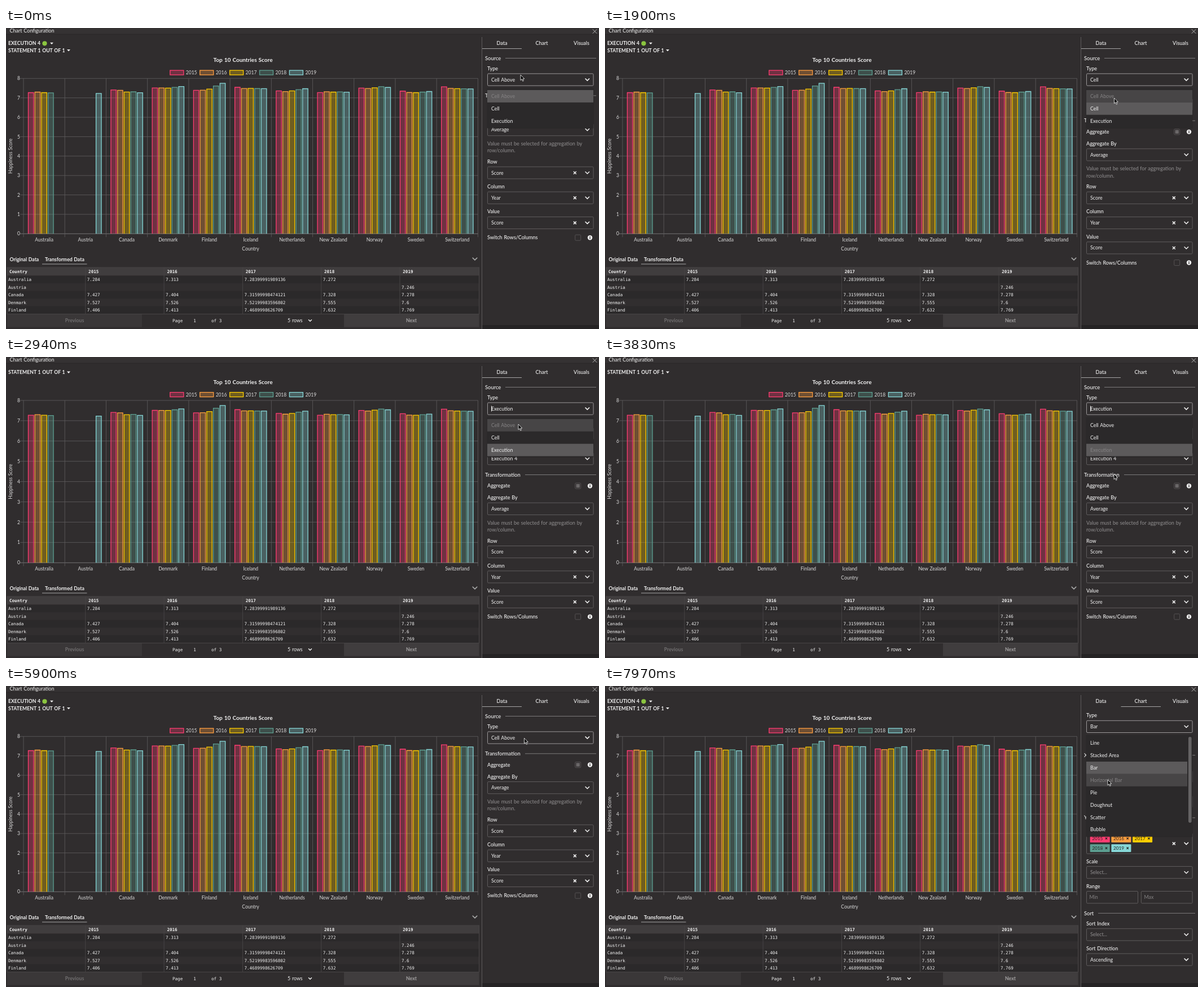
Recreate the animation shown at these times as an HTML page. Size 1051 by 533 pixels, loop 8000 ms.

```html
<!DOCTYPE html>
<html lang="en">
<head>
<meta charset="utf-8">
<title>Chart Configuration</title>
<style>
  html, body { margin: 0; width: 100%; height: 100%; overflow: hidden; background: #302d2e; }
  svg { display: block; width: 100vw; height: 100vh; }
  text { font: 400 9px Lato, "Open Sans", sans-serif; word-spacing: .06em; fill: #f2f2f2; white-space: pre; }
  .label { font-weight: 500; }
  .section { font-size: 9.4px; font-weight: 500; }
  .value { font-size: 8.85px; }
  .dim { fill: #918f90; }
  .faint { fill: #858384; }
  .bold { font-size: 8.7px; font-weight: 700; }
  .title { font-size: 10px; font-weight: 700; }
  .axis { font-size: 8.5px; fill: #dcdcdc; }
  .mono { font: 400 7.58px "DejaVu Sans Mono", "Noto Sans Mono", monospace; word-spacing: 0; }
  .head { font-weight: 700; }
  .mid { text-anchor: middle; }
  .end { text-anchor: end; }
  .tag { font-size: 8.3px; fill: #222; }
</style>
</head>
<body>
<svg viewBox="0 0 1051 533" preserveAspectRatio="none">
  <g id="frame"></g>
  <g id="chart"></g>
  <g id="panel"></g>
  <g id="menu"></g>
  <path id="cursor" d="M0 0V9.6L2.2 7.6 3.8 11.2 5.3 10.5 3.8 7H6.8Z" fill="#000" stroke="#fff" stroke-width=".8" stroke-linejoin="round"/>
</svg>
<script>
const $ = id => document.getElementById(id);

// Drawing helpers; text is placed by its vertical centre
const text = (x, y, s, cls = '', extra = '') =>
  `<text x="${x}" y="${y + (cls.includes('mono') ? 2.7 : 3.1)}" class="${cls}" ${extra}>${s}</text>`;
const rect = (x, y, w, h, fill, extra = '') =>
  `<rect x="${x}" y="${y}" width="${w}" height="${h}" fill="${fill}" ${extra}/>`;
const path = (d, color, width = 1, extra = '') =>
  `<path d="${d}" fill="none" stroke="${color}" stroke-width="${width}" ${extra}/>`;
const hline = (x1, x2, y, color, width) => path(`M${x1} ${y}H${x2}`, color, width);
const vline = (x, y1, y2, color, width) => path(`M${x} ${y1}V${y2}`, color, width);
const chevron = (x, y, color = '#f0f0f0', r = 3.3) =>
  path(`M${x - r} ${y - r / 2}L${x} ${y + r / 2}L${x + r} ${y - r / 2}`, color, 1.5, 'stroke-linecap="round"');
const cross = (x, y, r, color, width) =>
  path(`M${x - r} ${y - r}L${x + r} ${y + r}M${x + r} ${y - r}L${x - r} ${y + r}`, color, width);
const triangle = (x, y) => `<path d="M${x - 3} ${y - 1.6}h6l-3 3.4z" fill="#f2f2f2"/>`;

const YEARS = [2015, 2016, 2017, 2018, 2019];
const COLORS = ['#ff3d71', '#ff9f40', '#ffcd00', '#5c9e90', '#86d7d7'];
const SCORES = {
  'Australia': [7.284, 7.313, 7.284, 7.272, 0],
  'Austria': [0, 0, 0, 0, 7.246],
  'Canada': [7.427, 7.404, 7.316, 7.328, 7.278],
  'Denmark': [7.527, 7.526, 7.522, 7.555, 7.6],
  'Finland': [7.406, 7.413, 7.469, 7.632, 7.769],
  'Iceland': [7.561, 7.501, 7.504, 7.495, 7.494],
  'Netherlands': [7.378, 7.339, 7.377, 7.441, 7.488],
  'New Zealand': [7.286, 7.334, 7.314, 7.324, 7.307],
  'Norway': [7.522, 7.498, 7.537, 7.594, 7.554],
  'Sweden': [7.364, 7.291, 7.284, 7.314, 7.343],
  'Switzerland': [7.587, 7.509, 7.494, 7.487, 7.48]
};
const LONG_2017 = {
  'Australia': '7.28399991989136', 'Canada': '7.31599998474121',
  'Denmark': '7.52199983596802', 'Finland': '7.4689998626709'
};

function drawTable() {
  const cols = [0, 1, 2, 3, 4, 5].map(i => 2 + i * 139.3);
  let s = text(6.5, 409.5, 'Original Data', 'bold') + text(69, 409.5, 'Transformed Data', 'bold')
    + hline(64, 143.5, 418, '#a5a5a5') + chevron(831, 409, '#a8a8a8', 3.8)
    + rect(2, 424, 836, 14.5, '#403d3e');
  Object.keys(SCORES).slice(0, 5).forEach((name, i) => {
    const y = 445.4 + i * 13.55;
    s += rect(2, y - 6.8, 836, 13.5, i % 2 ? '#312e2f' : '#2b292a') + text(4, y, name, 'mono');
    SCORES[name].forEach((v, j) => {
      if (v) s += text(cols[j + 1] + 2.5, y, j === 2 ? LONG_2017[name] : v, 'mono');
    });
  });
  s += text(6, 431, 'Country', 'mono head');
  YEARS.forEach((year, j) => {
    s += text(cols[j + 1] + 4.8, 431, year, 'mono head') + vline(cols[j + 1] - .5, 424, 506.5, '#474445');
  });
  return s + rect(2, 424, 836.5, 82.5, 'none', 'stroke="#474445"')
    + rect(2, 507, 239, 22.5, '#3a3738') + text(121.5, 518, 'Previous', 'bold mid', 'style="fill:#716f70"')
    + text(295, 518, 'Page', 'mono') + text(334.5, 518, '1', 'mono mid') + text(364, 518, 'of 3', 'mono')
    + text(499, 518, '5 rows', 'value') + chevron(539, 518, '#f0f0f0', 2.5)
    + rect(599, 507, 239.5, 22.5, '#403d3e') + text(718.5, 518, 'Next', 'bold mid', 'style="fill:#a3a1a2"');
}

function drawFrame() {
  return rect(0, 0, 1051, 533, '#302d2e') + rect(0, 0, 1051, 11, '#353233') + hline(0, 1051, 11, '#282627')
    + text(6.5, 5, 'Chart Configuration') + cross(1043.5, 6, 3.7, '#b5b5b5', 1)
    + drawTable() + vline(843.5, 16, 533, '#5c595a') + rect(844, 526, 207, 7, '#252324')
    + text(879, 27.3, 'Data', 'label mid') + text(949.5, 27.3, 'Chart', 'label mid')
    + text(1020, 27.3, 'Visuals', 'label mid');
}

function drawChart(compact) {
  const up = compact ? 12.4 : 0, top = 89.3 - up, base = 364.3;
  const left = 31, step = 73.22, grid = '#615f60';
  const yOf = v => base - v * (base - top) / 8;
  let s = '';
  if (!compact) {
    s += text(4, 27.3, 'EXECUTION 4', 'bold') + '<circle cx="68.5" cy="27.3" r="4.1" fill="#8bc53f"/>' + triangle(81, 27.3);
  }
  s += text(4, 39.7 - up, 'STATEMENT 1 OUT OF 1', 'bold') + triangle(111, 39.5 - up)
    + text(420, 57 - up, 'Top 10 Countries Score', 'title mid');
  YEARS.forEach((year, i) => {
    const x = 290.8 + i * 52.9;
    s += rect(x, 75 - up, 24, 8, COLORS[i], `fill-opacity=".3" stroke="${COLORS[i]}" stroke-width="1.3"`)
      + text(x + 28, 79 - up, year, 'axis');
  });
  for (let v = 0; v <= 8; v++) {
    s += hline(25, 836.5, yOf(v), v ? grid : '#858384', .8) + text(25, yOf(v), v, 'axis end');
  }
  for (let i = 0; i <= 11; i++) s += vline(left + i * step, top, base + 6, grid, .8);
  Object.entries(SCORES).forEach(([name, values], i) => {
    const x0 = left + i * step;
    values.forEach((v, j) => {
      if (!v) return;
      const x = x0 + 8.5 + j * 11.72, w = 9.4, y = yOf(v) + .6;
      s += rect(x, y, w, base - y, COLORS[j], 'fill-opacity=".3"')
        + path(`M${x} ${base}V${y}h${w}V${base}`, COLORS[j], 1.3);
    });
    s += text(x0 + step / 2, 374.7, name, 'axis mid');
  });
  const mid = (top + base) / 2;
  return s + text(433.5, 391, 'Country', 'axis mid')
    + text(8, mid, 'Happiness Score', 'axis mid', `transform="rotate(-90 8 ${mid})"`);
}

// Side panel parts
const box = (x, y, w, h, color = '#5f5c5d') =>
  rect(x, y, w, h, 'none', `rx="1.5" stroke="${color}" stroke-width="1"`);
const check = (x, y, on) => box(x - 5, y - 5, 10, 10, '#555253')
  + (on ? rect(x - 3.2, y - 3.2, 6.4, 6.4, '#6a6768') : '');
const info = y => `<circle cx="1035" cy="${y}" r="4.2" fill="#f2f2f2"/>`
  + rect(1034.3, y - .8, 1.4, 3.2, '#302d2e') + rect(1034.3, y - 2.6, 1.4, 1.3, '#302d2e');
const section = (y, name, end) => text(849, y, name, 'section') + hline(end, 1046, y, '#858384', .9);

function select(y, value, { clear, focus, dim } = {}) {
  return box(853.5, y - 10.6, 187.5, 21.2, focus ? '#9b9899' : undefined)
    + text(860, y, value, dim ? 'value dim' : 'value')
    + (clear ? cross(1008.3, y, 2.4, '#f2f2f2', 1.5) : '') + chevron(1030.3, y);
}
const field = (y, name, value, options) => text(853, y, name, 'label') + select(y + 19.7, value, options);

const TYPES = ['Cell Above', 'Cell', 'Execution'];
const CHARTS = ['Line', 'Stacked Area', 'Bar', 'Horizontal Bar', 'Pie', 'Doughnut', 'Scatter', 'Bubble'];
const CHART_PANEL = 3;

function drawDataPanel(type) {
  const gap = 44.35, d = type * gap;
  return hline(844, 914, 36.5, '#a5a5a5') + section(53.5, 'Source', 885)
    + field(71.8, 'Type', TYPES[type], { focus: true })
    + (type > 0 ? field(116, 'Cell', 'Top 10 Countries Score') : '')
    + (type > 1 ? field(160.4, 'Execution', 'Execution 4') : '')
    + section(119.8 + d, 'Transformation', 920)
    + text(853, 139.5 + d, 'Aggregate', 'label') + check(1013.7, 139.5 + d, true) + info(139.5 + d)
    + field(160.4 + d, 'Aggregate By', 'Average')
    + text(853, 204.8 + d, 'Value must be selected for aggregation by', 'dim')
    + text(853, 217.2 + d, 'row/column.', 'dim')
    + field(236.7 + d, 'Row', 'Score', { clear: true })
    + field(281 + d, 'Column', 'Year', { clear: true })
    + field(325.3 + d, 'Value', 'Score', { clear: true })
    + text(853, 371.2 + d, 'Switch Rows/Columns', 'label') + check(1013.7, 371.2 + d) + info(371.2 + d);
}

function drawChartPanel() {
  const dim = { dim: true };
  let s = hline(914.5, 985, 36.5, '#a5a5a5') + field(52.2, 'Type', 'Bar', { focus: true })
    + text(853, 98.3, 'Stack Chart', 'label') + check(1031.3, 98.3)
    + section(122.6, 'X Axis', 882) + field(141, 'X Axis', 'Country') + field(185.2, 'Scale', 'Select...', dim)
    + section(233.3, 'Y Axis', 881) + text(853, 251.5, 'Series', 'label') + box(853.5, 260.7, 187.5, 36.3)
    + cross(1008.3, 279, 2.4, '#f2f2f2', 1.5) + chevron(1030.3, 279);
  YEARS.forEach((year, i) => {
    const x = 859.7 + i % 3 * 37.7, y = 270 + Math.floor(i / 3) * 17.1;
    s += rect(x, y - 6.9, 35, 13.8, COLORS[i], 'rx="1"') + text(x + 3.5, y, year, 'tag')
      + cross(x + 28.8, y, 1.7, '#222', 1.2);
  });
  return s + field(310.4, 'Scale', 'Select...', dim) + text(853, 354.7, 'Range', 'label')
    + box(853.5, 363.5, 91, 21.3) + text(858.5, 374.3, 'Min', 'value faint')
    + box(950.3, 363.5, 90.7, 21.3) + text(955.5, 374.3, 'Max', 'value faint')
    + section(402.4, 'Sort', 874) + field(420.6, 'Sort Index', 'Select...', dim)
    + field(464.8, 'Sort Direction', 'Ascending');
}

const ROW = 21.9;
const menuTop = panel => panel === CHART_PANEL ? 90.1 : 109.9;

function drawMenu(panel, focus, active) {
  const chart = panel === CHART_PANEL, items = chart ? CHARTS : TYPES;
  const selected = chart ? 2 : panel, top = menuTop(panel), width = chart ? 179 : 188;
  let s = rect(852.5, top - 3, 189, items.length * ROW + 5.2, '#1c1a1b', 'fill-opacity=".35"')
    + rect(853, top - 3, 188, items.length * ROW + 4.4, '#2b292a');
  items.forEach((name, i) => {
    const y = top + i * ROW, on = i === focus;
    const fill = on && active ? '#b2d4ff' : i === selected ? '#5c5a5b' : on ? '#474546' : '';
    if (fill) s += rect(853, y, width, ROW, fill);
    s += text(860, y + ROW / 2, name, on ? 'value faint' : 'value');
  });
  if (chart) s += rect(1034, 90, 5.6, 152, '#656364', 'rx="2.8"');
  return s;
}

// The picture advances in even steps
const LOOP = 8000, STEP = 147.7, LEAD = 17;

// [first step, panel, menu open, preset option]
const STAGES = [
  [0, 0, true], [4, 1], [11, 1, true, 1], [12, 1, true], [14, 2], [19, 2, true, 2], [20, 2, true],
  [39, 0], [44, CHART_PANEL], [49, CHART_PANEL, true, 2], [51, CHART_PANEL, true]
];
const PRESS_STEP = 13;

// [step, x, y]
const POINTER = [
  [0, 912, 83], [3, 907, 139], [5, 906, 137], [6, 906, 136], [8, 906, 131], [10, 905, 90], [11, 905, 92],
  [13, 900, 156], [16, 901, 159], [18, 906, 72], [19, 908, 90], [20, 908, 119], [24, 906, 132],
  [26, 902, 207], [28, 902, 207], [34, 900, 106], [36, 903, 88], [38, 905, 119], [39, 908, 114],
  [43, 950, 27], [45, 948, 34], [48, 931, 67], [49, 931, 68], [52, 903, 122], [54, 891, 166]
];

function pointerAt(k) {
  const i = Math.max(1, POINTER.findIndex(p => p[0] >= k));
  const [k0, x0, y0] = POINTER[i - 1], [k1, x1, y1] = POINTER[i];
  const f = (k - k0) / (k1 - k0);
  return [x0 + (x1 - x0) * f, y0 + (y1 - y0) * f];
}

function show(k) {
  const [, panel, open, preset] = STAGES.filter(s => s[0] <= k).pop();
  const [x, y] = pointerAt(k);
  const count = panel === CHART_PANEL ? CHARTS.length : TYPES.length;
  const hovered = Math.max(0, Math.min(count - 1, Math.floor((y - menuTop(panel)) / ROW)));
  $('chart').innerHTML = charts[panel === 2 ? 1 : 0];
  $('panel').innerHTML = panels[panel] + (open && panel === 2 ? vline(860.5, 86.5, 96.5, '#f2f2f2', .9) : '');
  $('menu').innerHTML = open ? drawMenu(panel, preset ?? hovered, k === PRESS_STEP) : '';
  $('cursor').setAttribute('transform', `translate(${x} ${y})`);
}

const charts = [drawChart(false), drawChart(true)];
const panels = [0, 1, 2].map(drawDataPanel).concat(drawChartPanel());
$('frame').innerHTML = drawFrame();

const start = performance.now();
let shown = -1;
function tick() {
  const t = (performance.now() - start) % LOOP;
  const k = Math.min(54, Math.floor((t + LEAD) / STEP));
  if (k !== shown) show(shown = k);
  requestAnimationFrame(tick);
}
tick();
</script>
</body>
</html>
```
